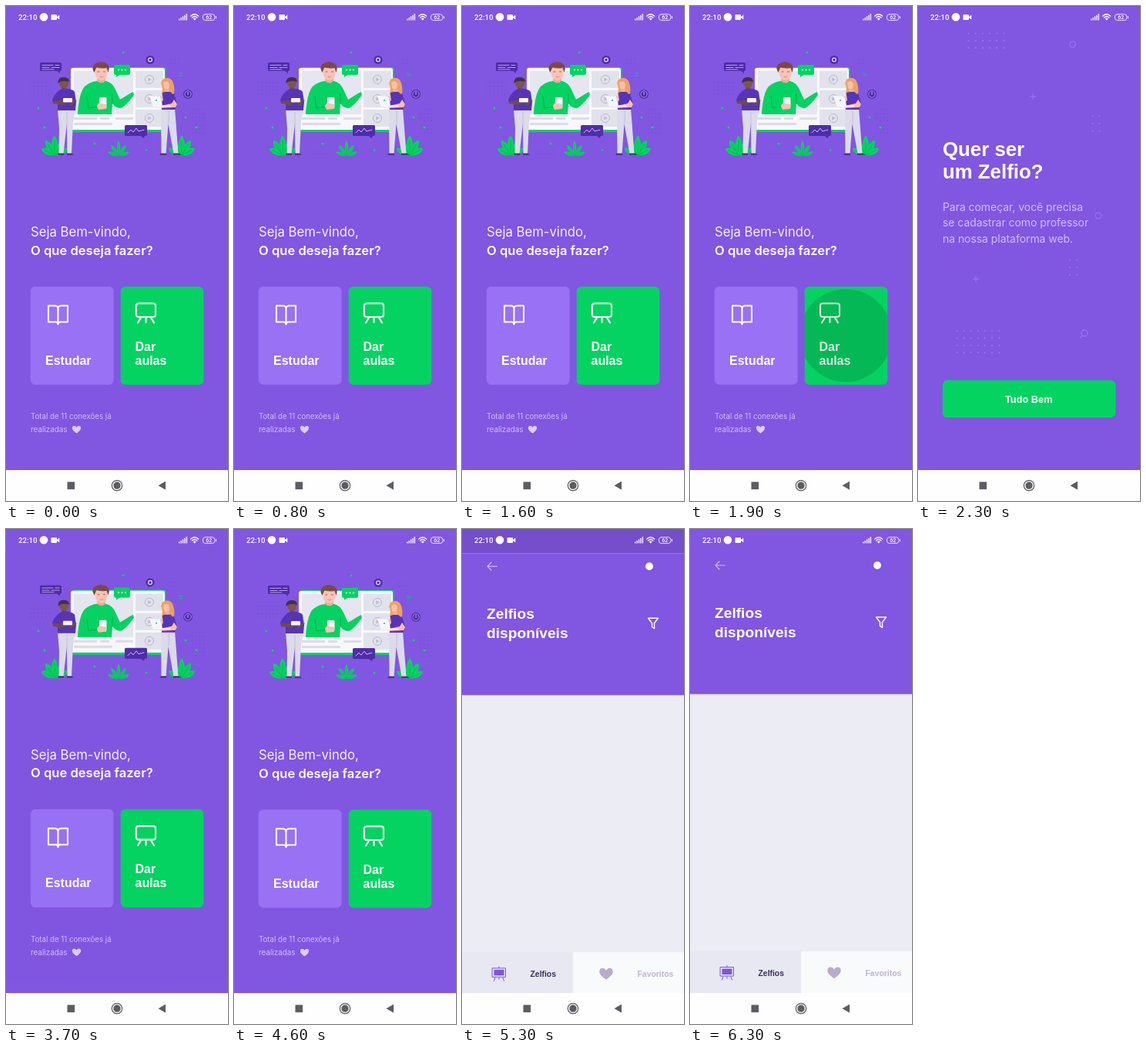
Animation, 288 px wide and 640 px high, one loop 6400 ms. Source, as an HTML page with a canvas:

```html
<!DOCTYPE html>
<html lang="pt-BR">
<head>
<meta charset="utf-8">
<title>Aulas</title>
<style>
  html, body { margin: 0; width: 100%; height: 100%; overflow: hidden; }
  canvas { display: block; width: 288px; height: 640px; }
</style>
</head>
<body>
<canvas id="stage"></canvas>
<script>
const W = 288, H = 640, CARD_H = 600, LOOP = 6400, STEP = 100;
const canvas = document.getElementById('stage');
const ctx = canvas.getContext('2d');
const dpr = window.devicePixelRatio || 1;
canvas.width = W * dpr;
canvas.height = H * dpr;

const PURPLE = '#8156e1', LILAC = '#9871f5', PALE = '#d0bdfb', GREEN = '#04d361';
const DARK = '#4f2da8', SHIRT = '#5733b8', GREY = '#dcdbe9', WHITE = '#fff';
const BOLD = '"Liberation Sans", Arial, sans-serif', ROUND = 'Inter, sans-serif';

// Drawing helpers
function rect(x, y, w, h, color, r = 0) {
  ctx.fillStyle = color;
  ctx.beginPath();
  ctx.roundRect(x, y, w, h, r);
  ctx.fill();
}
function disc(x, y, r, color) {
  ctx.fillStyle = color;
  ctx.beginPath();
  ctx.arc(x, y, r, 0, Math.PI * 2);
  ctx.fill();
}
function ring(x, y, r, color, width = 1) {
  ctx.strokeStyle = color;
  ctx.lineWidth = width;
  ctx.beginPath();
  ctx.arc(x, y, r, 0, Math.PI * 2);
  ctx.stroke();
}
function fill(d, color) {
  ctx.fillStyle = color;
  ctx.fill(new Path2D(d));
}
function stroke(d, color, width = 1) {
  ctx.strokeStyle = color;
  ctx.lineWidth = width;
  ctx.lineCap = ctx.lineJoin = 'round';
  ctx.stroke(new Path2D(d));
}
function text(str, x, y, size, family, weight, color) {
  ctx.font = `${weight} ${size}px ${family}`;
  ctx.fillStyle = color;
  ctx.fillText(str, x, y);
}
function dots(x, y, cols, rows, gapX, gapY, r, color) {
  for (let i = 0; i < cols; i++)
    for (let j = 0; j < rows; j++) disc(x + i * gapX, y + j * gapY, r, color);
}
function at(x, y, scale, draw) {
  ctx.save();
  ctx.translate(x, y);
  ctx.scale(scale, scale);
  draw();
  ctx.restore();
}
function heart(x, y, s, color) {
  at(x, y, s, () =>
    fill('M0 5 C-3 3 -6 .5 -6 -2 C-6 -6 -1.5 -6 0 -3 C1.5 -6 6 -6 6 -2 C6 .5 3 3 0 5Z', color));
}
function bezier(x1, y1, x2, y2) {
  const curve = (a, b, s) => 3 * a * s * (1 - s) ** 2 + 3 * b * s * s * (1 - s) + s ** 3;
  return t => {
    if (t <= 0 || t >= 1) return Math.min(1, Math.max(0, t));
    let lo = 0, hi = 1;
    for (let i = 0; i < 24; i++) {
      const mid = (lo + hi) / 2;
      if (curve(x1, x2, mid) < t) lo = mid; else hi = mid;
    }
    return curve(y1, y2, lo);
  };
}
const ease = bezier(0.20833, 0.82, 0.25, 1);

// Illustration
function leaves(x, y, s, width, spread) {
  at(x, y, s, () => {
    for (let i = -2; i <= 2; i++) {
      const len = 20 - 2.5 * Math.abs(i);
      ctx.save();
      ctx.rotate(i * spread);
      fill(`M0 0 Q${-width} ${-len * .6} 0 ${-len} Q${width} ${-len * .6} 0 0Z`, GREEN);
      stroke(`M0 -1 V${-len * .75}`, '#10a855', .5);
      ctx.restore();
    }
  });
}

function board() {
  rect(86, 79, 121.5, 84, GREEN, 3);
  rect(84, 80, 122, 80, '#f8f8fc', 3);
  rect(88, 84, 77, 56, '#e6e6f0', 1);
  rect(88, 144, 30, 3, GREY, 1);
  rect(122, 144, 12, 3, GREY, 1);
  rect(88, 151, 50, 3, GREY, 1);
  rect(142, 144, 23, 3, GREY, 1);
  for (const y of [84, 109, 134]) {
    rect(168, y, 36, 22, '#e2e2ed', 1);
    ring(186, y + 11, 5.5, '#b9b6ce', 1);
    fill(`M184.5 ${y + 8.5} l4 2.5 l-4 2.5Z`, '#b9b6ce');
  }
}

function teacher() {
  fill('M93 138 Q95 112 102 104 Q109 98 118 97 L130 97 Q138 99 142 108 L148 121 L161 113 L165 111 L166 115 Q156 129 149 132 Q142 132 138 126 L137 140 L93 140Z', GREEN);
  stroke('M105 117 L107 132 L121 130 M138 114 V126', '#08a74d', .9);
  fill('M119 90 H129 V97 Q124 102 118 97Z', '#efa899');
  fill('M115.5 80 H131.5 V88 Q130 96 124 96.5 Q117 95.5 115.5 87Z', '#f8c2b4');
  fill('M114.5 86 Q110 79 115 75 Q122 70 130 74 Q136 78 132.5 86 L130.5 80 Q123 81.5 117.5 79Z', '#7a4a42');
  stroke('M119 85 h2 M126.5 85 h2', '#65403a', .7);
  stroke('M122 91.5 q2 1.5 4 0', '#c9766c', .7);
  rect(121, 118, 9.5, 14, '#f5f6fb', 1.5);
  fill('M118 130 Q119 124 124 126 L130 127 V133 L120 134Z', '#f8c2b4');
}

function student() {
  fill('M67 133 L90 133 L87 150 L85 191 H79.5 L79 152 L74.5 191 H68.5 L69 158Z', GREY);
  stroke('M79 138 L79 156', '#bbb8d0', .8);
  fill('M67 111 Q70 107 77 106.5 Q86 107 89 111 L91 124 L90 135 H67Z', SHIRT);
  fill('M66 119 L60 122 L61 126 L73 128 L81 125 L80 122 L68 122Z', '#714c44');
  fill('M67 111 Q62 115 60 122 L68 123Z', SHIRT);
  fill('M87 121 L92 122 L84 129 L82 126Z', '#714c44');
  rect(74, 119, 12, 5.5, '#f7f6fd', 1);
  rect(72.5, 102, 5, 6, '#6c473f');
  fill('M69 97 H81 V101 Q80 106 76 106 Q70 105 69 100Z', '#7d554b');
  fill('M67.5 100 Q67 92 75 92 Q82 92 82 98 Q76 96 70 98Z', '#40314a');
  fill('M68 190.5 h7 v2 h-8Z M79 190.5 h6 l3 2 h-9Z', '#3a2a6b');
}

function assistant() {
  fill('M203 95 Q211 90 216 97 Q220 106 217.5 116 Q210 120 202 114 Q204 104 201 100Z', '#eda35e');
  fill('M201 132 H219 L223.5 191 H217.5 L210.5 152 L207.5 191 H201.5Z', GREY);
  stroke('M211 136 V151', '#bbb8d0', .8);
  fill('M203 112 Q211 109 218 113 L222 127 L219 134 H202Z', SHIRT);
  rect(206.5, 105, 5, 6, '#eeb0a0');
  fill('M204 98 Q208 95 212 99 L211.5 105 Q208 109 205 106Z', '#f8bfae');
  fill('M203 99 Q206 93 211 95 Q217 99 217.5 114 Q213 113 213 106 Q213 100 209 97Z', '#eda35e');
  fill('M203 115 L195 121 L187 119 L187 122 L196 126 L204 122Z', '#f8bfae');
  fill('M218 121 L222 127 L220 131 L202 132 L201 129 L215 126Z', '#f8bfae');
  fill('M186 116 L200 117 L203 129 L190 128Z', '#f7f6fd');
  stroke('M191 129.3 H213', '#fff', 1.2);
  disc(195, 122, 1, GREEN);
  fill('M201 190.5 h7 v2 h-9Z M217 190.5 h7 l4 2 h-11Z', '#3a2a6b');
}

function bubbles() {
  rect(44, 73, 28, 11, DARK, 1.5);
  fill('M65 83 H70 V87Z', DARK);
  stroke('M47 76.5 H61 M64 76.5 H69 M47 79.5 H56 M59 79.5 H69 M47 82 H62', '#cbbaf3', .8);
  rect(140, 76, 21, 13, GREEN, 2);
  fill('M143 88 H149 L143 92Z', GREEN);
  dots(146, 82.5, 3, 1, 4.5, 0, 1, WHITE);
  rect(154, 154, 29, 14, DARK, 1.5);
  fill('M173 167 H180 L179 171Z', DARK);
  stroke('M158 164 L162 160 L165 163 L169 158 L172 162 L179 160', '#d9cafb', .9);
  disc(187, 69.5, 5.5, DARK);
  ring(187, 69.5, 2.4, '#e0d4ff', 1.3);
  disc(236, 114, 6, DARK);
  ring(236, 114, 4.2, '#bca5f1', .8);
  stroke('M236 111.5 V114.5', '#e0d4ff', .8);
}

function illustration() {
  dots(32, 99, 6, 4, 4.8, 5, .6, '#6f4bcd');
  dots(242, 134, 4, 7, 4.7, 5, .6, '#6f4bcd');
  dots(214, 69, 3, 2, 5, 5, .6, '#6f4bcd');
  dots(98, 187, 5, 2, 5, 4.5, .6, '#6f4bcd');
  leaves(63, 193, 1.3, 6, .55);
  leaves(228, 193, 1.3, 6, .55);
  board();
  teacher();
  student();
  assistant();
  leaves(146, 194, 1, 4.5, .6);
  bubbles();
  for (const [x, y] of [[42, 132], [50, 157], [115, 178], [152, 60], [182, 186], [247, 157], [233, 144]])
    disc(x, y, 1.5, GREEN);
  stroke('M224 87 h5 M225 90 h4', GREEN, .9);
}

// Screens
function pressWave(x, y, start, now, box) {
  const age = now - start;
  if (age <= 0 || age > 500) return;
  ctx.save();
  ctx.beginPath();
  ctx.roundRect(...box);
  ctx.clip();
  disc(x, y, age / 2, 'rgba(0,0,0,.12)');
  ctx.restore();
}

function home(now) {
  rect(0, 0, W, CARD_H + 20, PURPLE);
  illustration();
  text('Seja Bem-vindo,', 32, 298, 16.7, ROUND, 400, '#f6f1ff');
  text('O que deseja fazer?', 32, 321.5, 16.6, ROUND, 600, WHITE);
  const study = [31.8, 362.7, 107.8, 127, 6.4], teach = [148.7, 362.7, 107.6, 127, 6.4];
  rect(...study.slice(0, 4), LILAC, study[4]);
  rect(...teach.slice(0, 4), GREEN, teach[4]);
  stroke('M67.5 390.5 Q67 387.5 63 387.5 H55 V408.5 H64 Q67.5 408.5 67.5 411.5 Q67.5 408.5 71 408.5 H80 V387.5 H72 Q68 387.5 67.5 390.5 V410.5', WHITE, 2.1);
  stroke('M172 384.5 H191 Q194 384.5 194 387.5 V399 Q194 402 191 402 H172 Q169 402 169 399 V387.5 Q169 384.5 172 384.5Z M175 403 L171 409.5 M188 403 L192 409.5 M181.5 402 V409', WHITE, 2.1);
  text('Estudar', 51, 463.5, 16, BOLD, 700, WHITE);
  text('Dar', 167.5, 445.5, 16, BOLD, 700, WHITE);
  text('aulas', 167.5, 463.5, 16, BOLD, 700, WHITE);
  pressWave(202, 426, 1780, now, teach);
  pressWave(86, 426, 4960, now, study);
  text('Total de 11 conexões já', 32, 534, 9.7, ROUND, 400, PALE);
  text('realizadas', 32, 551, 9.9, ROUND, 400, PALE);
  heart(91.5, 547.7, .95, '#dccdf8');
}

function invite(now) {
  rect(0, 0, W, CARD_H, PURPLE);
  dots(65.5, 35.5, 6, 3, 9.2, 9.3, 1.1, LILAC);
  dots(226.5, 142.5, 2, 3, 9, 9.5, 1.1, LILAC);
  dots(197, 328.5, 2, 3, 9, 9.5, 1.1, LILAC);
  dots(50.5, 420, 7, 4, 9.1, 9.4, 1.1, LILAC);
  ring(200.5, 49.5, 3.8, LILAC, 1.3);
  ring(234, 271, 3.8, LILAC, 1.3);
  ring(216, 423, 4, LILAC, 1.3);
  stroke('M213 426 L210.5 429 M149 113.5 V120.5 M145.5 117 H152.5 M75 349.5 V356.5 M71.5 353 H78.5', LILAC, 1.3);
  text('Quer ser', 32, 194, 25.8, BOLD, 700, WHITE);
  text('um Zelfio?', 32, 223, 25.8, BOLD, 700, WHITE);
  text('Para começar, você precisa', 32, 264.5, 13.9, ROUND, 400, PALE);
  text('se cadastrar como professor', 32, 284.5, 13.9, ROUND, 400, PALE);
  text('na nossa plataforma web.', 32, 305.5, 13.9, ROUND, 400, PALE);
  const button = [31.8, 483.8, 224.5, 48.2, 6.4];
  rect(...button.slice(0, 4), GREEN, button[4]);
  pressWave(172, 508, 3250, now, button);
  text('Tudo Bem', 113, 513, 12.8, BOLD, 700, WHITE);
}

function list() {
  rect(0, 0, W, CARD_H, '#ecedf4');
  rect(0, 0, W, 213.5, PURPLE);
  stroke('M45.5 47 H33 M38 42 L33 47 L38 52', '#cdb9fa', 1.2);
  disc(243, 47, 5, WHITE);
  text('Zelfios', 32, 115, 19.2, BOLD, 700, WHITE);
  text('disponíveis', 32, 140, 19.2, BOLD, 700, WHITE);
  stroke('M241.5 114 H254.5 L249.5 120.5 V127.5 L246.5 125.5 V120.5Z', WHITE, 1.4);
  rect(0, 546, 144, 54, '#e7e8f1');
  rect(144, 546, 144, 54, '#f9fafb');
  stroke('M39.5 566.5 H56.5 V578 H39.5Z M48 564.5 V566 M43 579 L41.5 583 M53 579 L54.5 583 M48 579 V581', '#8055df', 1);
  rect(41.5, 568.5, 13, 7.5, '#8055df');
  text('Zelfios', 88.5, 577.5, 10.4, BOLD, 700, '#3d3057');
  heart(187, 574, 1.45, '#b9abca');
  text('Favoritos', 227.5, 577.5, 10.4, BOLD, 700, '#c1b5cf');
}

// The next card is uncovered from the bottom while the one below drifts up and dims.
function reveal(screen, p, now) {
  at(0, -0.02 * CARD_H * p, 1, () => home(now));
  if (p <= 0) return;
  rect(0, 0, W, CARD_H, `rgba(0,0,0,${0.1 * p})`);
  const gap = CARD_H * (1 - p);
  ctx.save();
  ctx.beginPath();
  ctx.rect(0, gap, W, CARD_H - gap);
  ctx.clip();
  ctx.translate(0, gap * 0.041);
  screen(now);
  ctx.restore();
}

function systemBars() {
  text('22:10', 16, 18, 9.6, 'Roboto, sans-serif', 500, WHITE);
  disc(49, 14.3, 5.3, WHITE);
  rect(58.5, 11, 7.5, 7, WHITE, 1);
  fill('M66 14 L69.3 11.5 V17.5 L66 15Z', WHITE);
  for (let i = 0; i < 5; i++) rect(224 + i * 2.4, 16.5 - i * 1.6, 1.5, 2 + i * 1.6, '#efe8ff');
  stroke('M239.7 13 Q244.7 8.5 249.7 13 M241.4 15 Q244.7 12 248 15', WHITE, 1.2);
  fill('M242.7 16.3 Q244.7 14.7 246.7 16.3 L244.7 18.8Z', WHITE);
  ctx.strokeStyle = '#e9e0ff';
  ctx.lineWidth = 1;
  ctx.beginPath();
  ctx.roundRect(255.3, 10.6, 15.6, 8, 3.5);
  ctx.stroke();
  rect(271.8, 13, 1.2, 3.2, '#e9e0ff', .5);
  text('62', 259.2, 17.1, 7, 'Roboto, sans-serif', 500, WHITE);
  rect(0, CARD_H, W, H - CARD_H, '#fefefe');
  rect(79.5, 615.3, 9.6, 9.6, '#5c5c62');
  ring(144, 620, 6.7, '#5c5c62', 1.2);
  disc(144, 620, 4.7, '#5c5c62');
  fill('M197.5 620 L207 614.5 V625.5Z', '#5c5c62');
}

function draw(now) {
  ctx.setTransform(dpr, 0, 0, dpr, 0, 0);
  const progress = start => ease((now - start) / 425);
  if (now < 4500) reveal(invite, progress(1900) - progress(3440), now);
  else reveal(list, progress(5080), now);
  systemBars();
}

const began = performance.now();
function tick() {
  const now = (performance.now() - began) % LOOP;
  draw(Math.floor(now / STEP) * STEP);
  requestAnimationFrame(tick);
}
tick();
</script>
</body>
</html>
```
